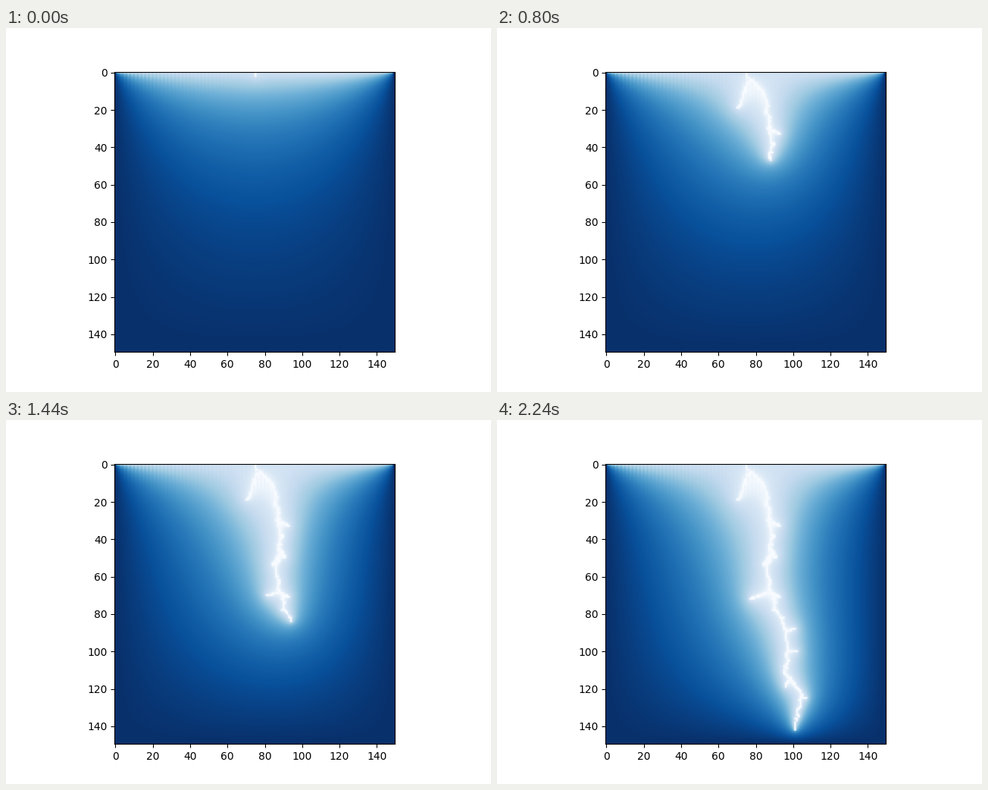
Animation of 640 by 480 pixels, one loop 2.32 s. Source, as a matplotlib script:

```python
import numpy as np
import matplotlib.pyplot as plt
from matplotlib.animation import FuncAnimation

N, FRAMES, STEP_MS = 150, 29, 80
TOP = 0.975      # potential of the upper electrode; the bolt sits at 1
OMEGA = 1.959    # over-relaxation factor for this grid size
SWEEPS = 260
BRANCH_RATE = 3  # cells a side branch grows per step

# Row reached by the tip over time, and the column of the trunk by row.
TIP_STEPS, TIP_ROWS = (0, 10, 17, 22, 28), (2, 47, 78, 111, 142)
BEND_ROWS = (2, 10, 22, 45, 58, 75, 92, 112, 121, 142)
BEND_COLS = (75, 83, 87, 88, 86, 90, 96, 96, 104, 102)
# Side branches: starting row, then reach across and down.
BRANCHES = [(4, -6, 15), (30, 6, 3), (45, 4, 5), (48, -4, 6), (69, -12, 3),
            (69, 4, 2), (89, 4, -1), (100, 5, 0), (115, -3, 4), (125, 3, 0)]


def bolt_births(rng):
    """Return the step at which each cell joins the bolt."""
    birth = np.full((N, N), np.inf)

    def trace(cols, rows, steps):
        cells = np.rint(rows).astype(int), np.rint(cols).astype(int)
        np.minimum.at(birth, cells, steps)

    rows = np.linspace(0, TIP_ROWS[-1], 600)
    knots = np.arange(0, N, 3)
    wiggle = rng.integers(-1, 2, knots.size) * (knots > 4)
    cols = np.interp(rows, BEND_ROWS, BEND_COLS) + np.interp(rows, knots, wiggle)
    steps = np.interp(rows, TIP_ROWS, TIP_STEPS)
    trace(cols, rows, steps)

    s = np.linspace(0, 1, 60)
    for row, across, down in BRANCHES:
        col, start = np.interp(row, rows, cols), np.interp(row, rows, steps)
        growth = s * (abs(across) + abs(down)) / BRANCH_RATE
        trace(col + across * s**0.8, row + down * s**1.4, start + growth)

    # Short random spurs roughen the channel.
    for y, x in np.argwhere(np.isfinite(birth)):
        if y > 4 and rng.random() < 0.25:
            side = x + rng.choice([-1, 1])
            birth[y, side] = min(birth[y, side], birth[y, x] + 0.7)
    return birth


def relax(u, bolt):
    """Red-black over-relaxation of the Laplace equation around the bolt."""
    u[bolt] = 1
    rows, cols = np.indices((N - 2, N - 2))
    free = ~bolt[1:-1, 1:-1]
    weights = [OMEGA * (free & ((rows + cols) % 2 == k)) for k in (0, 1)]
    inner = u[1:-1, 1:-1]
    for _ in range(SWEEPS):
        for w in weights:
            mean = (u[:-2, 1:-1] + u[2:, 1:-1] + u[1:-1, :-2] + u[1:-1, 2:]) / 4
            inner += w * (mean - inner)


def glow(u):
    """Brightness of a potential: linear when weak, steep near the bolt."""
    return 0.46 * u + 0.41 * u**5 + 0.13 * u**150


def simulate():
    birth = bolt_births(np.random.default_rng(4))
    y, x = np.indices((N, N))
    ripple = 1 - 0.09 * np.exp(-x / 25 - y / 12) * ((x % 2 == 0) & (y > 0))
    u = np.zeros((N, N))
    u[0, 1:-1] = TOP
    fields = []
    for step in range(FRAMES):
        bolt = birth <= step
        relax(u, bolt)
        fields.append(glow(np.where(bolt, 1, np.clip(u * ripple, 0, 1))))
    return fields


fields = simulate()
fig, ax = plt.subplots(figsize=(6.4, 4.8), dpi=100)
image = ax.imshow(fields[0], cmap="Blues_r", vmin=0, vmax=1)


def update(step):
    image.set_data(fields[step])
    return [image]


anim = FuncAnimation(fig, update, frames=FRAMES, interval=STEP_MS,
                     repeat=True, repeat_delay=0)
plt.show()
```
